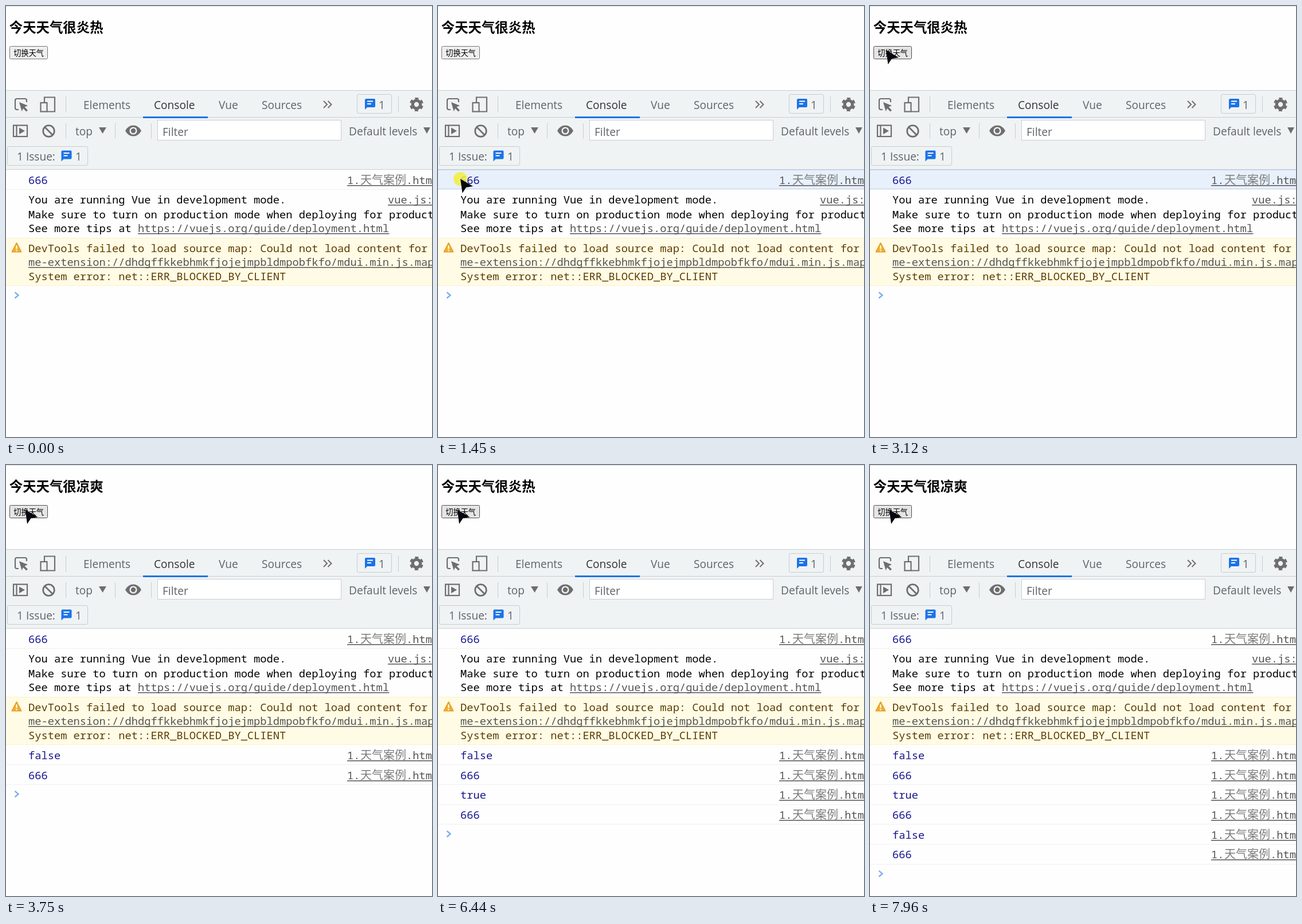
An HTML page that plays this animation: 743 px wide and 753 px high, repeating every 8 s.

```html
<!DOCTYPE html>
<html lang="zh-CN">
<head>
<meta charset="utf-8">
<title>Weather toggle</title>
<style>
html, body { margin: 0; width: 100%; height: 100%; overflow: hidden; background: #fefefe; }
svg { display: block; width: 743px; height: 753px; }
text { white-space: pre; }
.ui { font: 19.1px "Open Sans", "Noto Sans", sans-serif; fill: #5f6368; }
.mono { font: 18.73px "Noto Sans Mono", monospace; }
.cjk { font-family: "Noto Sans CJK SC", "Noto Sans CJK", sans-serif; }
.link { fill: #545454; }
.thin { fill: #7c7c7c; font-size: 20px; font-weight: 300; }
.value { fill: #16168f; }
.warn { fill: #5c3c00; }
.icon { fill: none; stroke: #6e6e6e; stroke-width: 2.2; }
.solid { fill: #6e6e6e; }
.edge { fill: none; stroke: #cacdd1; }
</style>
</head>
<body>
<svg viewBox="0 0 743 753">
  <defs>
    <g id="msg">
      <path d="M2 0H16Q18 0 18 2V13Q18 15 16 15H4L0 19V2Q0 0 2 0Z" fill="#1a73e8"/>
      <path d="M4 4.5H14M4 9H11" stroke="#fff" stroke-width="2"/>
    </g>
  </defs>
  <rect width="743" height="753" fill="#fefefe"/>
  <path d="M0 .5H743" stroke="#d9dadb"/>

  <text id="title" class="cjk" x="5.8" y="45.7" font-size="23.4" font-weight="700"></text>
  <rect id="btn" x="6.5" y="70.5" width="66" height="22" rx="2"/>
  <text class="cjk" x="13.3" y="86.8" font-size="13.2">切换天气</text>

  <rect y="148" width="743" height="138" fill="#f0f3f4"/>
  <path class="edge" d="M0 147.5H743M0 194.5H743M0 285.5H743M104.5 158V186M684.5 158V186M104.5 205V232M190.5 205V232M253.5 205V232"/>
  <rect x="239" y="193" width="113" height="3" fill="#1a73e8"/>

  <g class="icon">
    <path d="M22 181H19Q16 181 16 178V165Q16 162 19 162H33Q36 162 36 165V168"/>
    <path d="M67 168V159.5H85V184.5H72"/>
    <rect x="60.5" y="169" width="11" height="15.5"/>
    <path d="M554 166L560 172L554 178M561.5 166L567.5 172L561.5 178" stroke-width="2"/>
    <rect x="13" y="208.5" width="24" height="19.5"/>
    <path d="M18.5 208V228"/>
    <circle cx="74.5" cy="218.5" r="9.8" stroke-width="2.7"/>
    <path d="M67.5 211.5L81.5 225.5" stroke-width="2.7"/>
    <circle cx="716" cy="172" r="6.8" stroke-width="5.2"/>
    <circle cx="716" cy="172" r="10.4" stroke-width="3.4" stroke-dasharray="6 4.89" stroke-dashoffset="8.45"/>
  </g>
  <g class="solid">
    <path d="M23 168L38 174L32.5 176.5L38 182L35.5 184.5L30 179L27.5 184Z"/>
    <path d="M23 212.5V224L33 218.2Z"/>
    <path d="M162 212H175L168.5 223Z"/>
    <path d="M728 212H740L734 223Z"/>
    <path d="M208 218Q213 208.5 222 208.5T236 218Q231 227.5 222 227.5T208 218Z"/>
    <circle cx="222" cy="218" r="5.4" fill="none" stroke="#f0f3f4" stroke-width="2.4"/>
  </g>

  <rect class="edge" x="612.5" y="154.5" width="60" height="33" rx="2.5"/>
  <rect class="edge" x="2.5" y="245.5" width="140" height="33" rx="2.5"/>
  <rect x="264.5" y="199.5" width="320" height="35" fill="#fff" stroke="#cacdd1"/>
  <use href="#msg" x="626" y="162"/>
  <use href="#msg" x="96.5" y="252.5"/>
  <g id="labels" class="ui"></g>

  <path d="M0 320.5H743" stroke="#f0f0f0"/>
  <g id="focus">
    <rect y="286" width="743" height="34" fill="#e8f0fc"/>
    <path d="M0 286.5H743M0 319.5H743" stroke="#c3d4ee"/>
  </g>
  <rect y="405" width="743" height="84" fill="#fffbe5"/>
  <path d="M0 405.5H743M0 488.5H743" stroke="#fdf2c4"/>
  <path d="M18.5 414L26.5 429.5H10.5Z" fill="#f3b02c" stroke="#e6a02a" stroke-width="1.8" stroke-linejoin="round"/>
  <path d="M18.5 418.5V424.5M18.5 426.3V428.5" stroke="#fff" stroke-width="2.2"/>
  <g id="log" class="mono"></g>
  <path id="prompt" d="M15.5 -5.2L21.5 0L15.5 5.2" fill="none" stroke="#7cb1ec" stroke-width="2.5"/>

  <circle id="halo" r="12" fill="#f1ee3c" opacity=".85"/>
  <path id="cursor" d="M0 0L22 13L10 15L3.5 25Z" fill="#08070f"/>
</svg>
<script>
const $ = id => document.getElementById(id);
const LOOP = 8000, STEP = 11.24;

function add(parent, tag, attrs, text) {
  const el = document.createElementNS("http://www.w3.org/2000/svg", tag);
  for (const k in attrs) el.setAttribute(k, attrs[k]);
  if (text) el.textContent = text;
  return parent.appendChild(el);
}

const labels = [
  ["Elements", 135, 180], ["Console", 258, 180, "#303236"], ["Vue", 371, 180],
  ["Sources", 446, 180], ["1", 650, 180], ["top", 121, 226], ["Filter", 273, 227],
  ["Default levels", 598, 226], ["1 Issue:", 19, 270], ["1", 121, 270]
];
for (const [s, x, y, color] of labels)
  add($("labels"), "text", { x, y, style: color ? "fill:" + color : "" }, s);

const log = $("log");
const line = (s, y, cls = "", x = 39, g = log) => add(g, "text", { x, y, class: cls }, s);
const underline = (x, y, width, g = log) =>
  add(g, "rect", { class: "link", x, y: Math.round(y) + 2, width, height: 1.5 });

function link(s, x, y) {
  line(s, y, "link", x);
  underline(x, y, s.length * STEP);
}

function fileLink(g, y) {
  line("1.", y, "link", 595, g);
  line("天气案例", y, "cjk thin", 618, g);
  line(".html", y, "link", 698, g);
  underline(595, y, 148, g);
}

line("666", 311, "value");
fileLink(log, 311);
line("You are running Vue in development mode.", 345);
link("vue.js:", 666, 345);
line("Make sure to turn on production mode when deploying for production.", 371);
line("See more tips at ", 395);
link("https://vuejs.org/guide/deployment.html", 230, 395);
line("DevTools failed to load source map: Could not load content for", 430, "warn");
link("me-extension://dhdgffkkebhmkfjojejmpbldmpobfkfo/mdui.min.js.map", 39, 454);
line("System error: net::ERR_BLOCKED_BY_CLIENT", 479, "warn");

// Each toggle prints its new state and a marker
const batches = ["false", "true", "false"].map((state, i) => {
  const g = add(log, "g", {});
  [state, "666"].forEach((s, j) => {
    const y = 514 + (i * 2 + j) * 34.65;
    line(s, y, "value", 39, g);
    fileLink(g, y);
    add(g, "path", { d: `M0 ${Math.round(y + 9.3) + .5}H743`, stroke: "#f0f0f0" });
  });
  return g;
});

// Pointer stops: time, x, y
const stops = [
  [200, 660, 726], [480, 215, 268], [740, 80, 147], [960, 36, 262],
  [1190, 54, 336], [1400, 39, 302], [1860, 40, 304], [2230, 93, 309],
  [2600, 42, 296], [2720, 40, 292], [3080, 28, 77], [3200, 28, 77],
  [3380, 33.5, 78], [8000, 33.5, 78]
];
const presses = [[1390, 1560], [3400, 3540], [5150, 5290], [6900, 7040]];

function pointer(t) {
  let i = 0;
  while (i < stops.length - 2 && t >= stops[i + 1][0]) i++;
  const [t0, x0, y0] = stops[i], [t1, x1, y1] = stops[i + 1];
  const u = Math.max(0, Math.min(1, (t - t0) / (t1 - t0)));
  const e = u * u * (3 - 2 * u);
  return [x0 + (x1 - x0) * e, y0 + (y1 - y0) * e];
}

const show = (el, on) => el.setAttribute("visibility", on ? "visible" : "hidden");

function draw(t) {
  const [x, y] = pointer(t);
  const down = presses.some(([a, b]) => t >= a && t < b);
  const count = presses.slice(1).filter(p => t >= p[1]).length;
  const over = t >= 200 && x > 6 && x < 73 && y > 70 && y < 93;

  for (const id of ["cursor", "halo"]) $(id).setAttribute("transform", `translate(${x} ${y})`);
  show($("cursor"), t >= 200);
  show($("halo"), down);
  show($("focus"), t >= 1390 && t < 3400);
  batches.forEach((g, i) => show(g, i < count));

  $("title").textContent = "今天天气很" + (count % 2 ? "凉爽" : "炎热");
  $("btn").setAttribute("fill", over ? (down ? "#f5f5f5" : "#e5e5e5") : "#efefef");
  $("btn").setAttribute("stroke", over ? (down ? "#8d8d8d" : "#4f4f4f") : "#767676");
  $("prompt").setAttribute("transform", `translate(0 ${505.3 + count * 69.6})`);
}

const start = performance.now();
function tick() {
  draw((performance.now() - start) % LOOP);
  requestAnimationFrame(tick);
}
tick();
</script>
</body>
</html>
```
